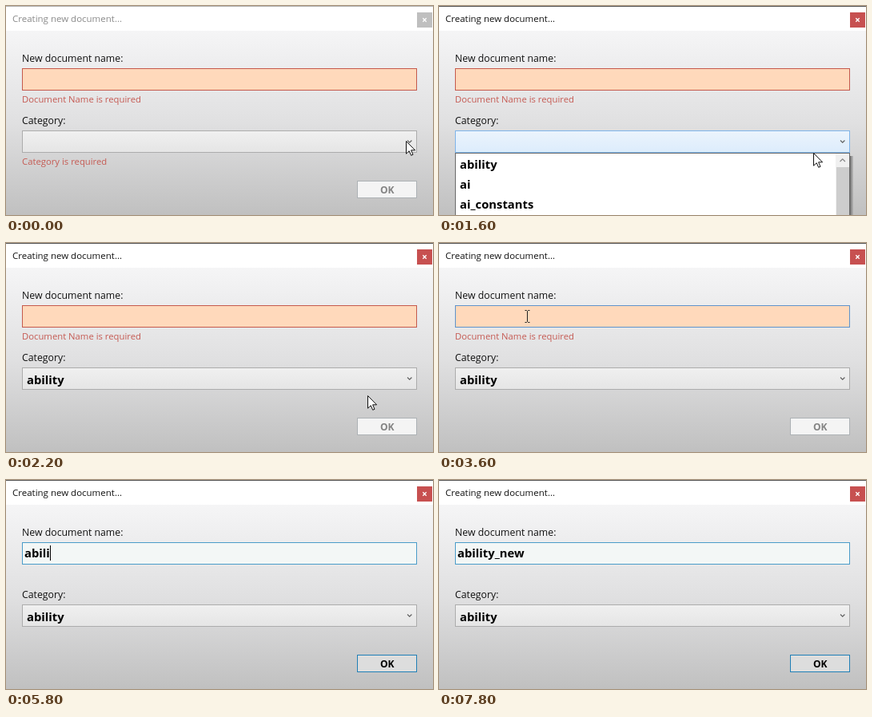
Animation of 534x262 px, one loop 8 s. Source, as an HTML page:

```html
<!DOCTYPE html>
<html lang="en">
<head>
<meta charset="utf-8">
<title>New document dialog</title>
<style>
  html, body { margin: 0; width: 100%; height: 100%; overflow: hidden; background: #fff; }
  svg { display: block; }
  text { font: 12.3px "Open Sans", "Noto Sans", sans-serif; fill: #111; white-space: pre; }
  .title { font-size: 11.5px; }
  .error { font-size: 11.3px; fill: #c55a53; }
  .bold { font-size: 14.8px; font-weight: 700; fill: #000; }
  .ok { font-size: 12px; font-weight: 700; text-anchor: middle; fill: #838383; }
  .box { stroke-width: 1; }
  .chevron { fill: none; stroke: #606060; stroke-width: 1.2; }

  #edge { fill: #555; }
  #close { fill: #c75050; }
  #combo { fill: url(#face); stroke: #acacac; }
  #field { fill: #ffd9bb; stroke: #c5594c; }
  #okBox { fill: #f4f4f4; stroke: #adb2b5; }

  .inactive #edge { fill: #b4b4b4; }
  .inactive #close { fill: #bfbfbf; }
  .inactive .title { fill: #8a8a8a; }
  .hover #combo { fill: url(#hoverFace); stroke: #7eb4ea; }
  .focus #field { stroke: #5f93cb; }
  .valid #field { fill: #f3f7f6; stroke: #4a9cc9; }
  .valid #okBox { fill: #dddddd; stroke: #1f7fb6; }
  .valid .ok { fill: #000; }
</style>
</head>
<body>
<svg id="stage" width="534" height="262" viewBox="0 0 534 262">
  <defs>
    <linearGradient id="back" x2="0" y2="1">
      <stop offset="0" stop-color="#f5f5f6"/>
      <stop offset=".5" stop-color="#e0e0e1"/>
      <stop offset="1" stop-color="#c0c0c0"/>
    </linearGradient>
    <linearGradient id="face" x2="0" y2="1">
      <stop offset="0" stop-color="#f0f0f0"/>
      <stop offset="1" stop-color="#e5e5e5"/>
    </linearGradient>
    <linearGradient id="hoverFace" x2="0" y2="1">
      <stop offset="0" stop-color="#ecf4fc"/>
      <stop offset="1" stop-color="#dcecfc"/>
    </linearGradient>
    <linearGradient id="shade">
      <stop offset="0" stop-color="#666"/>
      <stop offset="1" stop-color="#999" stop-opacity=".4"/>
    </linearGradient>
    <clipPath id="below"><rect y="184" width="534" height="78"/></clipPath>
  </defs>

  <rect width="534" height="31" fill="#fff"/>
  <rect y="31" width="534" height="231" fill="url(#back)"/>
  <rect id="edge" width="534" height="1"/>
  <text class="title" x="8" y="20">Creating new document...</text>
  <rect id="close" x="514" y="8" width="19" height="19"/>
  <path d="M521.3 15.3l4.4 4.4m0-4.4l-4.4 4.4" stroke="#fff" stroke-width="1.3"/>

  <text x="20" y="70">New document name:</text>
  <rect id="field" class="box" x="20.5" y="78.5" width="493" height="27"/>
  <text id="typed" class="bold" x="23" y="97"></text>
  <rect id="caret" y="82" width="1" height="19"/>
  <text id="nameError" class="error" x="20" y="121">Document Name is required</text>

  <text x="20" y="148">Category:</text>
  <rect id="combo" class="box" x="20.5" y="156.5" width="493" height="27"/>
  <path class="chevron" d="M502 168.5l2.7 2.7 2.7-2.7"/>
  <text id="choice" class="bold" x="26" y="177">ability</text>
  <text id="categoryError" class="error" x="20" y="199">Category is required</text>

  <rect id="okBox" class="box" x="439.5" y="219.5" width="74" height="21"/>
  <text class="ok" x="476.7" y="234.6">OK</text>

  <g id="popup" clip-path="url(#below)">
    <rect x="514" y="188" width="4" height="80" fill="url(#shade)"/>
    <rect x="20.5" y="184.5" width="493" height="90" fill="#fff" stroke="#6a6a6a"/>
    <g id="sliding">
      <rect x="21" y="184" width="476" height="2" fill="#fff"/>
      <rect x="496" y="184" width="17" height="78" fill="#cdcdcd"/>
    </g>
    <g id="opened">
      <rect x="496" y="185" width="17" height="77" fill="#f0f0f0"/>
      <rect x="497" y="202" width="16" height="60" fill="#cdcdcd"/>
      <path class="chevron" d="M501.5 195l3.2-3.2 3.2 3.2" style="stroke:#858585"/>
      <rect id="mark" x="21.5" y="185.5" width="474" height="24" fill="#bae0f2" stroke="#35a1cf"/>
    </g>
  </g>

  <path id="arrow" d="M.5 .5V16.2L4.2 12.7L6.7 18.3L9 17.3L6.6 11.8H11.6Z" fill="#fff" stroke="#111"/>
  <path id="beam" d="M-3 -7.5H-1L0 -6.5L1 -7.5H3M0 -6.5V6.5M-3 7.5H-1L0 6.5L1 7.5H3" fill="none" stroke="#222"/>
</svg>
<script>
  const LOOP = 8000, STEP = 200;
  const $ = id => document.getElementById(id);
  const stage = $("stage"), typed = $("typed"), caret = $("caret");

  // Pointer path: time, x, y
  const path = [
    [0, 500, 169], [1200, 500, 169], [1800, 452, 191], [2300, 452, 191],
    [2800, 300, 146], [3400, 110, 92], [LOOP, 110, 92]
  ];
  // Typed text by start time
  const typing = [
    [0, ""], [5400, "a"], [5600, "abi"], [5800, "abili"], [6000, "abilit"], [6200, "ability"],
    [6600, "ability_"], [6800, "ability_n"], [7200, "ability_ne"], [7400, "ability_new"]
  ];

  function addRows(group, names, y) {
    names.forEach((name, i) => {
      const row = document.createElementNS(stage.namespaceURI, "text");
      row.setAttribute("class", "bold");
      row.setAttribute("x", 26);
      row.setAttribute("y", y + 25 * i);
      row.textContent = name;
      group.append(row);
    });
  }
  addRows($("sliding"), ["map", "missile", "mob", "mothership"], 181);
  addRows($("opened"), ["ability", "ai", "ai_constants"], 204);

  const within = (t, a, b) => t >= a && t < b;
  const show = (id, on) => { $(id).style.display = on ? "" : "none"; };

  function pointerAt(t) {
    const i = path.findIndex(p => p[0] > t);
    const [t0, x0, y0] = path[i - 1], [t1, x1, y1] = path[i];
    const u = (t - t0) / (t1 - t0);
    return [x0 + (x1 - x0) * u, y0 + (y1 - y0) * u];
  }

  function draw(t) {
    const [x, y] = pointerAt(t);
    const open = within(t, 800, 2200);
    const chosen = t >= 2200;
    const valid = t >= 5400;
    const inField = y > 78 && y < 106;

    stage.classList.toggle("inactive", t < 800);
    stage.classList.toggle("hover", t >= STEP && y > 156 && y < 184);
    stage.classList.toggle("focus", t >= 3400);
    stage.classList.toggle("valid", valid);

    show("popup", open);
    show("sliding", t < 1000);
    show("opened", t >= 1000);
    show("mark", y >= 184);
    show("choice", chosen);
    show("categoryError", !chosen);
    show("nameError", !valid);

    show("arrow", !valid && !inField);
    show("beam", !valid && inField);
    $("arrow").setAttribute("transform", `translate(${Math.round(x)} ${Math.round(y)})`);
    $("beam").setAttribute("transform", `translate(${Math.round(x) + .5} ${Math.round(y)})`);

    const text = typing.filter(k => k[0] <= t).pop()[1];
    if (typed.textContent !== text) typed.textContent = text;
    const width = text ? typed.getComputedTextLength() : 0;
    caret.setAttribute("x", Math.round(23 + width));
    show("caret", within(t, 4200, 4800) || within(t, 5400, 7800));
  }

  const start = performance.now();
  function tick() {
    const t = (performance.now() - start) % LOOP;
    draw(Math.floor(t / STEP) * STEP);
    requestAnimationFrame(tick);
  }
  tick();
</script>
</body>
</html>
```
